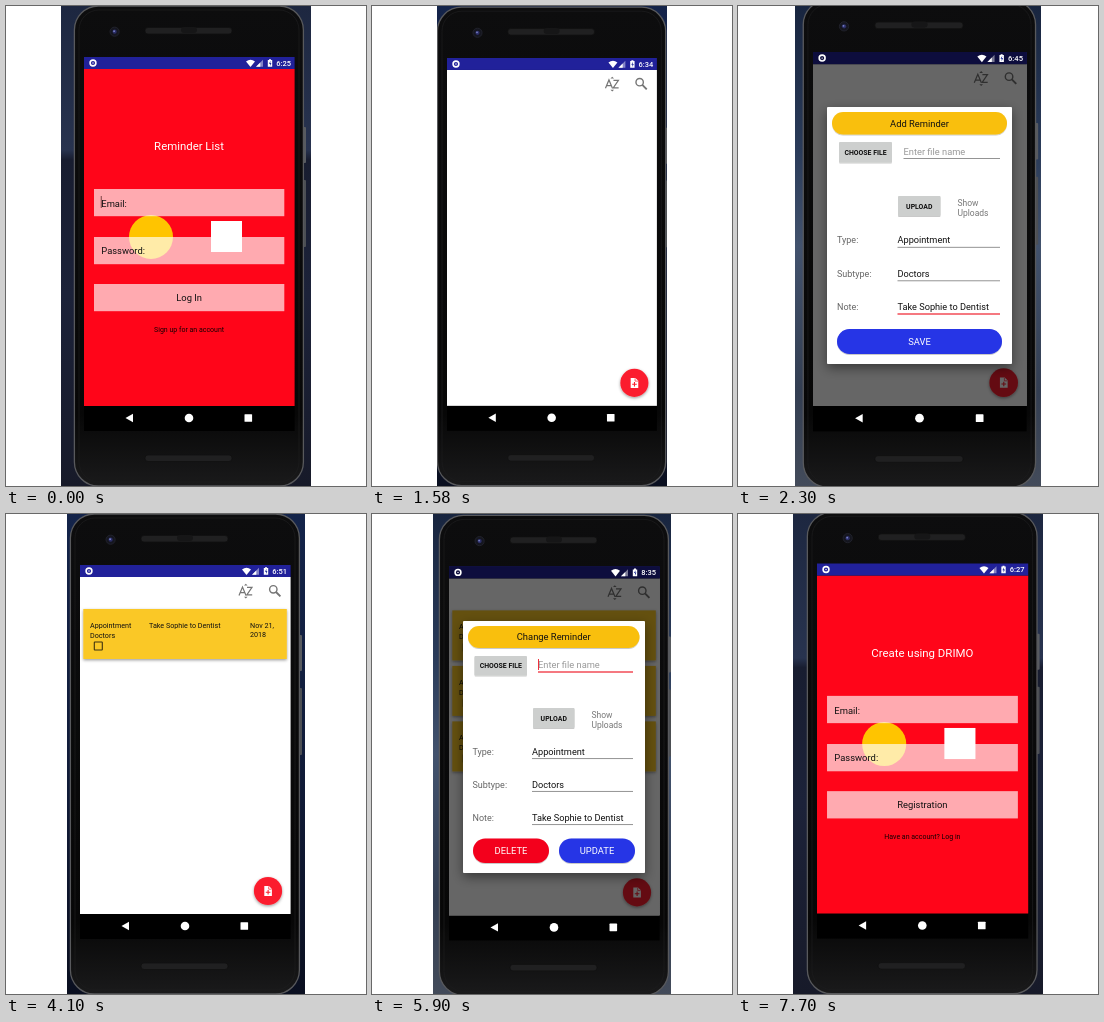
These frames come from a looping animation (360x480 px, 8 s). An HTML page:

```html
<!DOCTYPE html>
<html lang="en">
<head>
<meta charset="utf-8">
<title>Reminder app</title>
<style>
  html, body { margin: 0; width: 100%; height: 100%; overflow: hidden; background: #fff; }
  svg { display: block; width: 360px; height: 480px; }
  text { font-family: Roboto, "Noto Sans", sans-serif; }
</style>
</head>
<body>
<svg id="stage" viewBox="0 0 360 480" xmlns="http://www.w3.org/2000/svg">
  <defs>
    <linearGradient id="night" x1="0" y1="0" x2="0" y2="1">
      <stop offset="0" stop-color="#1d2740"/>
      <stop offset=".3" stop-color="#28334f"/>
      <stop offset=".32" stop-color="#181d30"/>
      <stop offset=".6" stop-color="#1c2239"/>
      <stop offset="1" stop-color="#171a29"/>
    </linearGradient>
    <linearGradient id="dusk" x1="0" y1="0" x2="0" y2="1">
      <stop offset="0" stop-color="#18253f"/>
      <stop offset=".3" stop-color="#2a3b59"/>
      <stop offset=".5" stop-color="#42526d"/>
      <stop offset=".8" stop-color="#333e52"/>
      <stop offset="1" stop-color="#434b5a"/>
    </linearGradient>
    <linearGradient id="deep" x1="0" y1="0" x2="0" y2="1">
      <stop offset="0" stop-color="#14244a"/>
      <stop offset=".6" stop-color="#101a36"/>
      <stop offset="1" stop-color="#0a0f20"/>
    </linearGradient>
    <linearGradient id="shell" x1="0" y1="0" x2="0" y2="1">
      <stop offset="0" stop-color="#0d0d0e"/>
      <stop offset=".85" stop-color="#070707"/>
      <stop offset="1" stop-color="#1a1a1b"/>
    </linearGradient>
    <filter id="soft" x="-30%" y="-30%" width="160%" height="160%">
      <feDropShadow dx="0" dy="1.2" stdDeviation="1.4" flood-opacity=".4"/>
    </filter>
    <filter id="lift" x="-30%" y="-30%" width="160%" height="160%">
      <feDropShadow dx="0" dy=".7" stdDeviation=".6" flood-opacity=".3"/>
    </filter>
    <filter id="float" x="-30%" y="-30%" width="160%" height="160%">
      <feDropShadow dx="0" dy="4" stdDeviation="6" flood-opacity=".45"/>
    </filter>
  </defs>
</svg>
<script>
const LOOP = 8000;
const BLUE = '#2634e6', AMBER = '#f9bf0b', RED = '#ff0519', GREY = '#666';
const NOTE = 'Take Sophie to Dentist';
const W = 210.6, H = 349;

const rect = (x, y, w, h, fill, extra = '') =>
  `<rect x="${x}" y="${y}" width="${w}" height="${h}" fill="${fill}" ${extra}/>`;
const disc = (x, y, r, fill, extra = '') =>
  `<circle cx="${x}" cy="${y}" r="${r}" fill="${fill}" ${extra}/>`;
const path = (d, fill, extra = '') => `<path d="${d}" fill="${fill}" ${extra}/>`;
const text = (s, x, y, size, fill = '#111', extra = '') =>
  `<text x="${x}" y="${y}" font-size="${size}" fill="${fill}" ${extra}>${s}</text>`;
const mid = (s, x, y, size, fill, extra = '') =>
  text(s, x, y, size, fill, 'text-anchor="middle" ' + extra);
const rule = (x1, x2, y, color = '#888', w = 0.9) => rect(x1, y - w / 2, x2 - x1, w, color);

// Phone parts use the screen's top left corner as origin.
function body() {
  return rect(218, 70, 4, 36, '#585b60', 'rx="1"') + rect(218, 123, 4, 67, '#4c4f54', 'rx="1"') +
    rect(-9.6, -51, 229, 480, 'url(#shell)', 'rx="24" stroke="#58595c" stroke-width="1.3"') +
    rect(-5, -47, 220, 472, 'none', 'rx="20" stroke="#1c1c1d" stroke-width=".8"') +
    rect(61, -29.5, 87, 6.5, '#202021', 'rx="3" stroke="#111" stroke-width=".8"') +
    rect(97, -30, 16, 6, '#161617', 'rx="3"') +
    rect(61, 398, 87, 6.5, '#202021', 'rx="3" stroke="#111" stroke-width=".8"') +
    disc(30.6, -25.3, 4.6, '#15161f', 'stroke="#252630" stroke-width=".8"') +
    disc(30.6, -25.3, 2.1, '#2c2f6a') + disc(30.1, -25.8, 0.9, '#7b83c4') +
    rect(0, H, W, 25, '#000') +
    path('M41.5 361 L49 356.8 V365.2Z', '#fff') + disc(105, 361, 4.3, '#fff') +
    rect(160.5, 357.2, 7.6, 7.6, '#fff', 'rx=".6"');
}

function status(time) {
  return disc(9, 6, 2.9, 'none', 'stroke="#fff" stroke-width="1.6"') + disc(9, 6, 0.7, '#fff') +
    path('M162 4.4 Q166.5 1 171 4.4 L166.5 10Z', '#fff') +
    path('M179 2.8 V9.8 H172Z', '#fff', 'opacity=".45"') +
    path('M176.3 5.5 V9.8 H172Z', '#fff') +
    path('M183.8 3 H185 V2.2 H187 V3 H188.2 V9.8 H183.8Z', '#fff') +
    path('M186.6 3.8 L184.9 6.7 H186 V9 L187.4 6 H186.3Z', '#23309a') +
    text(time, 207, 8.8, 7.5, '#fff', 'text-anchor="end" font-weight="500"');
}

function toolbar() {
  return `<g fill="none" stroke="#757575" stroke-width="1.2">
    <path d="M159 30.4 L162.5 22 L166 30.4 M160.2 27.7 H164.8"/>
    <path d="M167 22.4 H172 L166.8 29.9 H172.2"/>
    <circle cx="193.3" cy="24.3" r="3.7" stroke-width="1.4"/>
    <path d="M196 27 L200.4 31.4" stroke-width="1.9"/></g>` +
    path('M164 20.6 L165.8 18.8 L167.6 20.6Z M164 31.8 L165.8 33.6 L167.6 31.8Z', '#757575');
}

function fab() {
  return disc(188, 326, 14.1, '#fb1f2e', 'filter="url(#soft)"') +
    path('M184.3 321 H189 L191.9 323.9 V331 H184.3Z', '#fff') +
    path('M188.7 321.4 V324.2 H191.6', 'none', 'stroke="#fb1f2e" stroke-width=".7"') +
    path('M188.1 325 V329.6 M185.8 327.3 H190.4', 'none', 'stroke="#fb1f2e" stroke-width="1.1"');
}

function login(title, action, hint, caret) {
  const field = y => rect(10, y, 190.3, 27.2, '#fff', 'fill-opacity=".66"');
  return rect(0, 12, W, H - 12, RED) +
    disc(67, 180, 22, '#ffc400') + rect(127, 164, 31, 31, '#fff') +
    [132, 180, 227].map(field).join('') +
    mid(title, 105, 93.4, 11.4, '#fff') +
    text('Email:', 17.3, 149.7, 9.4) + text('Password:', 17.3, 197.1, 9.4) +
    mid(action, 105.1, 244.3, 9.4, '#111') + mid(hint, 105.1, 274.6, 7, '#140002') +
    (caret ? rect(16.8, 139, 0.8, 12, '#5a2a2a') : '');
}

const home = cards => rect(0, 12, W, H - 12, '#fff') + toolbar() + cards + fab();

function card(y) {
  const t = (s, x, dy) => text(s, x, y + dy, 7.2);
  return rect(3.3, y, 203.5, 50, '#fac828', 'filter="url(#soft)"') +
    t('Appointment', 10, 19) + t('Doctors', 10, 29) + t(NOTE, 69, 19) +
    t('Nov 21,', 170, 19) + t('2018', 170, 27.6) +
    rect(14.3, y + 33, 8, 8, 'none', 'stroke="#3c3210" stroke-width="1.1" rx=".5"');
}

const pill = (s, x, y, w, h, fill, ink) =>
  rect(x, y, w, h, fill, `rx="${h / 2}" filter="url(#lift)"`) +
  mid(s, x + w / 2, y + h / 2 + 3.3, 9.4, ink);
const key = (s, x, y, w, h) =>
  rect(x, y, w, h, '#cdcfce', 'rx="1" filter="url(#lift)"') +
  mid(s, x + w / 2, y + h / 2 + 2.6, 6.9, '#111', 'font-weight="700"');

// Dialogs are laid out in stage units: rows hold label, value, baseline, line y, line colour.
function dialog(d) {
  const rows = d.rows.map(([label, value, y, line, color]) =>
    text(label, d.left, y, 9, GREY) + text(value, d.mid, y, 9.2) +
    rule(d.mid, d.right, line, color, color ? 1.3 : 0.9)).join('');
  return rect(...d.box, '#fff', 'rx="1" filter="url(#float)"') + d.head +
    key('CHOOSE FILE', ...d.choose) + key('UPLOAD', ...d.upload) +
    text('Enter file name', d.hint[0], d.hint[1], 9.3, '#999') +
    rule(d.hint[0], d.right, d.hint[2], d.focus ? '#f0303c' : '#888', d.focus ? 1.3 : 0.9) +
    (d.focus ? rect(d.hint[0], d.hint[1] - 9, 1, 11, '#f0303c') : '') +
    text('Show', 219.5, d.show, 8.5, '#777') + text('Uploads', 219.5, d.show + 9.6, 8.5, '#777') +
    rows + d.foot;
}

const addForm = dialog({
  box: [89, 101, 185, 257], left: 99, mid: 159.5, right: 262,
  head: pill('Add Reminder', 94, 106, 175, 22.5, AMBER, '#111'),
  choose: [101, 136, 53, 20.5], upload: [160, 190, 42.5, 20],
  hint: [165.5, 149, 152.5], show: 200,
  rows: [['Type:', 'Appointment', 237, 241.3], ['Subtype:', 'Doctors', 270.5, 274.8],
         ['Note:', NOTE, 304, 308, '#f0303c']],
  foot: pill('SAVE', 99, 323, 165, 25, BLUE, '#fff')
});

const editForm = dialog({
  box: [91, 107, 182, 252], left: 100.5, mid: 160, right: 261,
  head: pill('Change Reminder', 96, 112, 171.5, 22, AMBER, '#111'),
  choose: [102.5, 142, 52.5, 19.5], upload: [161, 194, 41.5, 20],
  hint: [166, 154, 158], show: 204.3, focus: true,
  rows: [['Type:', 'Appointment', 240.8, 244.6], ['Subtype:', 'Doctors', 273.8, 277.4],
         ['Note:', NOTE, 306.7, 310.6]],
  foot: pill('DELETE', 101, 324.5, 76, 24.5, '#f3061f', '#fff') +
        pill('UPDATE', 187, 324.5, 76, 24.5, BLUE, '#fff')
});

// Scene steps: start time, strip edges, screen origin and width, clock and contents.
const scenes = [
  { at: 0, strip: [55, 305], sky: 'night', pos: [78, 51, 210], time: '6:25',
    screen: login('Reminder List', 'Log In', 'Sign up for an account', true) },
  { at: 500, strip: [65, 295], sky: 'deep', pos: [75, 52, 209.3], time: '6:34', screen: home('') },
  { at: 2300, strip: [57, 303], sky: 'dusk', pos: [75, 46, 213], time: '6:45',
    screen: home(''), over: addForm },
  { at: 4100, strip: [61, 299], sky: 'deep', pos: [74, 51, 210], time: '6:51', screen: home(card(44)) },
  { at: 5900, strip: [61, 299], sky: 'dusk', pos: [77, 52.4, 210], time: '8:35',
    screen: home([44, 99.5, 155].map(card).join('')), over: editForm },
  { at: 7700, strip: [55, 305], sky: 'night', pos: [79, 49.5, 210.6], time: '6:27',
    screen: login('Create using DRIMO', 'Registration', 'Have an account? Log in') }
];

function build({ strip: [x1, x2], sky, pos: [x, y, w], time, screen, over = '' }, i) {
  const shade = over && rect(0, 0, W, H, '#000', 'fill-opacity=".6"');
  return `<clipPath id="crop${i}">${rect(x1, 0, x2 - x1, 480, '#000')}</clipPath>
    <g class="scene" clip-path="url(#crop${i})">${rect(x1, 0, x2 - x1, 480, `url(#${sky})`)}
    <g transform="translate(${x} ${y}) scale(${w / 210})">
    ${body()}${screen}${rect(0, 0, W, 12, '#21219a')}${shade}${status(time)}</g>${over}</g>`;
}

const stage = document.getElementById('stage');
stage.insertAdjacentHTML('beforeend', scenes.map(build).join(''));
const layers = [...stage.querySelectorAll('.scene')];
const start = performance.now();

function draw(now) {
  const t = Math.max(0, now - start) % LOOP;
  const current = scenes.findLastIndex(s => t >= s.at);
  layers.forEach((g, i) => { g.style.display = i === current ? '' : 'none'; });
  requestAnimationFrame(draw);
}
draw(start);
</script>
</body>
</html>
```
